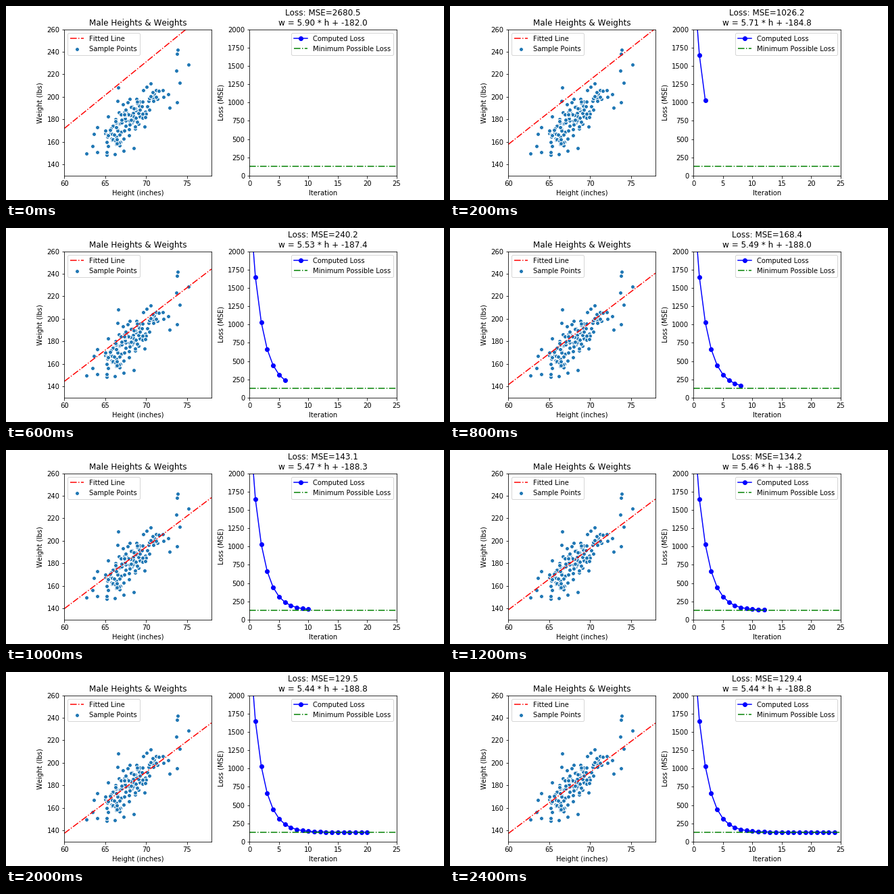
A matplotlib script that plays this animation: 648 px wide and 288 px high, repeating every 2500 ms.

```python
import numpy as np
import matplotlib.pyplot as plt
from matplotlib.animation import FuncAnimation

STEPS = 25
DECAY = 0.77                     # error kept per descent step
SLOPE, OFFSET = 5.436, -188.8    # least-squares fit
MIN_LOSS, FIRST_LOSS = 129.4, 2680.5

plt.rcParams['text.kerning_factor'] = 6


def approach(start, end, rate, n):
    return end + (start - end) * rate ** n


def sample_points(count=128, seed=11):
    """Noisy heights and weights around the fit, plus a few far points."""
    rng = np.random.default_rng(seed)
    h = rng.triangular(64.3, 67.6, 73.1, count)
    noise = np.clip(rng.normal(0, 9.5, count), -17, 17)
    far = np.array([
        (62.7, 149.7), (63.45, 156.3), (64.05, 151), (63.6, 167),
        (64, 173), (66.2, 149), (67.25, 152), (68.5, 154.4),
        (66.6, 208.3), (66.5, 196.3), (73.8, 195.2), (73.85, 242),
        (73.8, 238.2), (75.2, 228.7), (73.7, 223.3), (74.1, 212.8),
    ])
    core = np.column_stack([h, SLOPE * h + OFFSET + noise])
    return np.vstack([core, far]).T


def style(ax, xlim, ylim, xticks, yticks, xlabel, ylabel):
    ax.set(xlim=xlim, ylim=ylim, xticks=xticks, yticks=yticks,
           xlabel=xlabel, ylabel=ylabel)
    ax.set_box_aspect(1)


fig, (ax_fit, ax_loss) = plt.subplots(1, 2, figsize=(9, 4), dpi=72)
fig.subplots_adjust(left=0.125, right=0.9, bottom=0.125, top=0.88, wspace=0.2)

heights = np.array([60, 78])
fit_line, = ax_fit.plot([], [], 'r-.', label='Fitted Line')
ax_fit.scatter(*sample_points(), color='C0', edgecolors='white',
               linewidths=1, label='Sample Points')
style(ax_fit, (60, 78), (130, 260), range(60, 78, 5), range(140, 261, 20),
      'Height (inches)', 'Weight (lbs)')
ax_fit.set_title('Male Heights & Weights')
ax_fit.legend(loc='upper left')

loss_line, = ax_loss.plot([], [], 'bo-', label='Computed Loss')
ax_loss.plot([0, 25], [MIN_LOSS] * 2, 'g-.', label='Minimum Possible Loss')
style(ax_loss, (0, 25), (0, 2000), range(0, 26, 5), range(0, 2001, 250),
      'Iteration', 'Loss (MSE)')
title = ax_loss.set_title('')
ax_loss.legend(loc='upper right')


def update(n):
    w = approach(5.901, SLOPE, DECAY, n)
    b = approach(-182.0, OFFSET, DECAY, n)
    steps = np.arange(n + 1)
    losses = approach(FIRST_LOSS, MIN_LOSS, DECAY ** 2, steps)
    fit_line.set_data(heights, w * heights + b)
    loss_line.set_data(steps, losses)
    title.set_text(f'Loss: MSE={losses[-1]:.1f}\nw = {w:.2f} * h + {b:.1f}')
    return fit_line, loss_line, title


anim = FuncAnimation(fig, update, frames=STEPS, interval=100,
                     repeat=True, repeat_delay=0)
plt.show()
```
